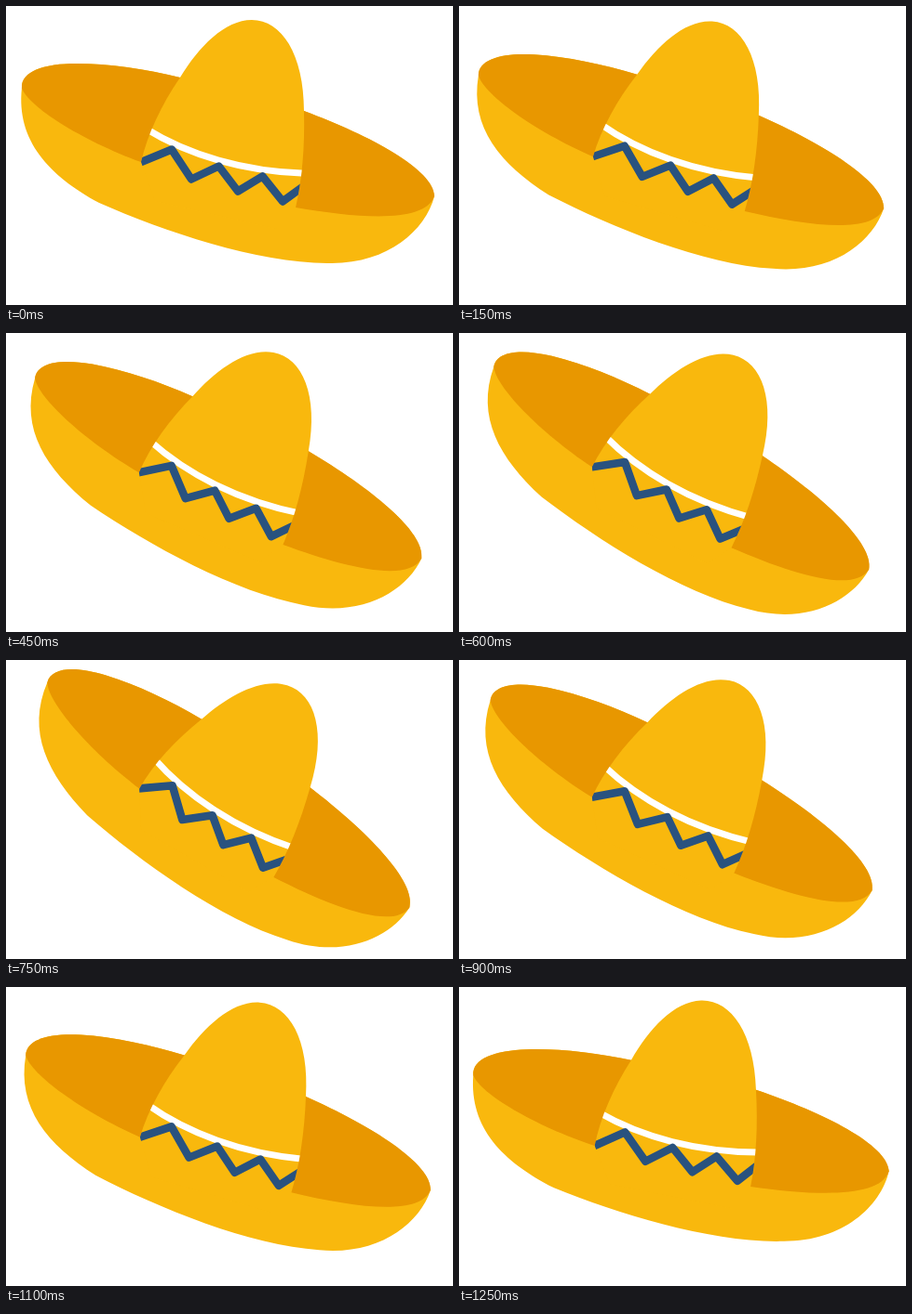
These frames come from a looping animation (480 px wide and 322 px high, 1350 ms). An HTML page:

```html
<!DOCTYPE html>
<html lang="en">
<head>
<meta charset="utf-8">
<title>Swinging sombrero</title>
<style>
  html, body { margin: 0; width: 100%; height: 100%; overflow: hidden; background: #fff; }
  svg { display: block; width: 480px; height: 322px; }
</style>
</head>
<body>
<svg viewBox="0 0 480 322">
  <defs>
    <path id="crown" d="M145 168C152 138 167 106 187 77C207 44 235 15 264 15C296 15 320 52 320 113C321 152 318 187 311 217L290 240L160 210Z"/>
    <clipPath id="inCrown"><use href="#crown"/></clipPath>
  </defs>
  <g id="hat">
    <path fill="#f9b80d" d="M17 88C11 145 46 182 100 212C170 243 270 277 345 277C408 279 450 243 460 205C459 176 392 140 320 113L187 77C150 68 110 62 75 62C42 62 16 70 17 88Z"/>
    <path fill="#e89700" d="M17 88C24 108 80 144 145 168L311 217C380 229 450 234 460 205C459 176 392 140 320 113L187 77C150 68 110 62 75 62C42 62 16 70 17 88Z"/>
    <use href="#crown" fill="#f9b80d"/>
    <g clip-path="url(#inCrown)" fill="none">
      <path stroke="#fff" stroke-width="7" d="M150 132C195 160 255 179 325 180.500"/>
      <path stroke="#29527f" stroke-width="8.500" stroke-linejoin="round" d="M140 170L178 154.500L199 186.500L228.500 172.500L249 199.500L275.500 183.500L297 210.500L325 190"/>
    </g>
  </g>
</svg>
<script>
  const hat = document.getElementById('hat');
  const LOOP = 1350, POSES = 18, PEAK = 10, LOW = 17;
  const MAX = 17.1, MIN = -1.75;

  // Poses alternate between 50 ms and 100 ms.
  const poseAt = t => 2 * Math.floor(t / 150) + (t % 150 >= 50 ? 1 : 0);

  // Slow linear swing up, faster linear swing back.
  function angleAt(pose) {
    if (pose > PEAK) return MAX + (MIN - MAX) * (pose - PEAK) / (LOW - PEAK);
    return MIN + (MAX - MIN) * (pose + POSES - LOW) / (PEAK + POSES - LOW);
  }

  const start = performance.now();
  function draw(now) {
    const t = Math.max(0, now - start) % LOOP;
    hat.setAttribute('transform', `rotate(${angleAt(poseAt(t)).toFixed(2)} 242.5 147)`);
    requestAnimationFrame(draw);
  }
  draw(start);
</script>
</body>
</html>
```
